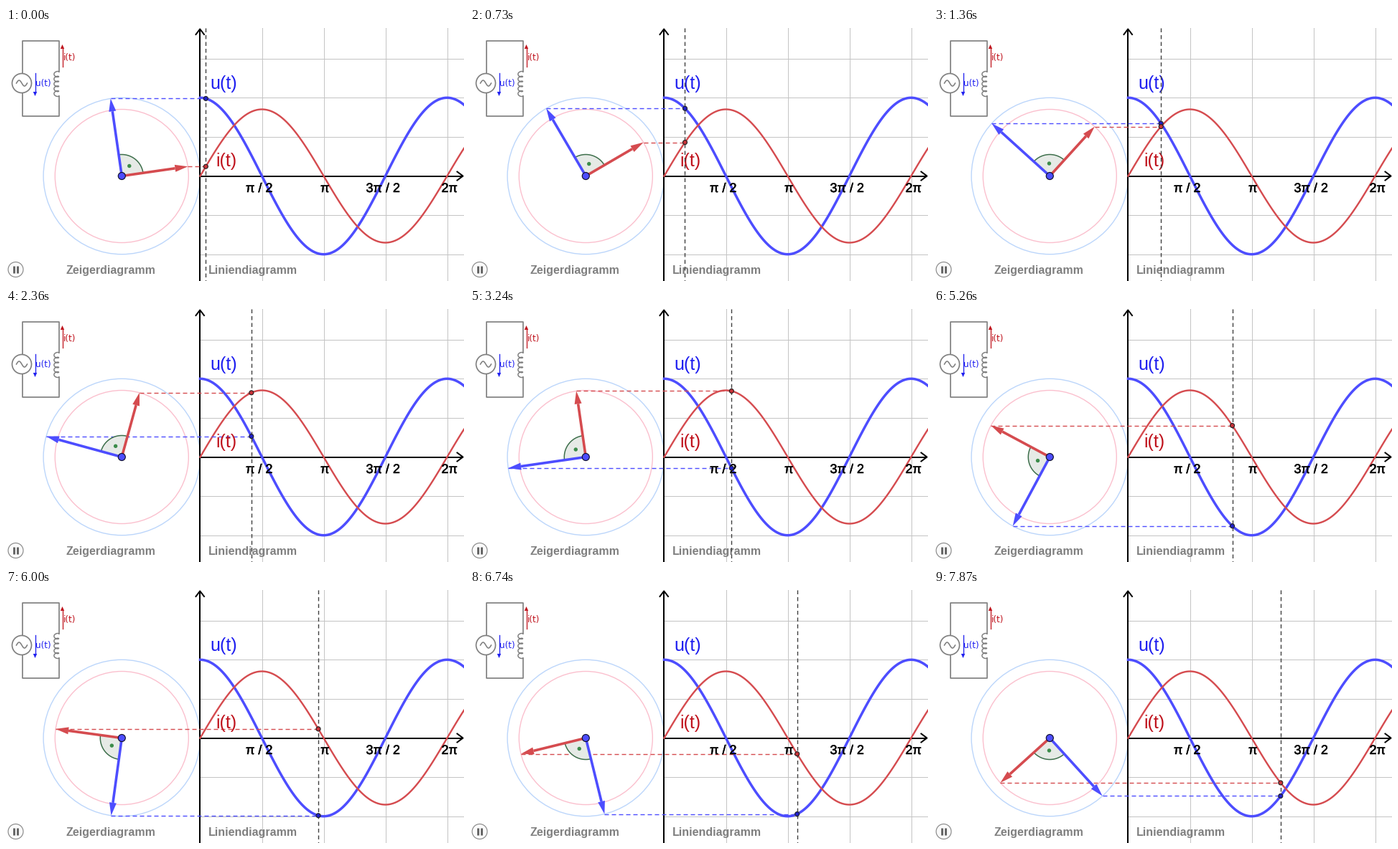
Write a matplotlib script that moves like this. It is 638x353 px and loops after 7990 ms.

```python
import numpy as np
import matplotlib.pyplot as plt
from matplotlib.animation import FuncAnimation
from matplotlib.patches import Circle, Polygon
from matplotlib.patheffects import withStroke

W, H, DPI = 638, 353, 100
LOOP, STEP = 7990, 34
PX = 72 / DPI

CX, CY = 161.3, 206.5          # phasor centre
X0, QUARTER = 270.5, 86.0      # time axis origin, pixels per quarter period
RU, RI = 109.2, 93.0           # amplitudes of voltage and current

BLUE, RED = "#4d4dff", "#d54b4f"
DEEP_BLUE, DEEP_RED = "#2020f0", "#c0141e"
GREY = "#808080"

plt.rcParams["lines.scale_dashes"] = False
plt.rcParams["path.simplify"] = False
plt.rcParams["toolbar"] = "None"

# Moments at which the picture advances: first, last, number of steps
RUNS = [(130, 860, 7), (980, 1740, 7), (1860, 2610, 7), (2740, 3490, 7),
        (3610, 4110, 5), (4250, 5000, 7), (5130, 5750, 6), (5890, 6250, 4),
        (6390, 7120, 7), (7250, 7870, 6)]
TICKS = np.concatenate([np.linspace(*run) for run in RUNS])

# Phase in degrees at some of the steps
KEY_STEP = [0, 7, 11, 14, 21, 26, 28, 33, 40, 42, 46, 50, 54, 57, 63]
KEY_PHASE = [8.2, 34.0, 47.8, 56.3, 82.0, 98.2, 104.3, 120.7, 145.6, 151.8,
             165.9, 178.5, 193.8, 202.8, 222.2]

fig = plt.figure(figsize=(W / DPI, H / DPI), dpi=DPI, facecolor="white")
ax = fig.add_axes([0, 0, 1, 1])
ax.set_xlim(0, W)
ax.set_ylim(H, 0)
ax.axis("off")


def line(xs, ys, color, width, z=2, dash=None, **kw):
    style = (0, [d * PX for d in dash]) if dash else "-"
    return ax.plot(xs, ys, color=color, lw=width * PX, ls=style, zorder=z,
                   dash_capstyle="butt", **kw)[0]


def disc(x, y, r, face, edge, width, z):
    return ax.add_patch(Circle((x, y), r, fc=face, ec=edge, lw=width * PX, zorder=z))


def label(x, y, s, size, color, font="Liberation Sans", weight="normal", stroke=0):
    t = ax.text(x, y, s, fontsize=size * PX, color=color, family=font,
                weight=weight, ha="left", va="baseline", zorder=6)
    if stroke:
        t.set_path_effects([withStroke(linewidth=stroke * PX, foreground=color)])


def polar(r, deg):
    a = np.radians(deg)
    return CX + r * np.cos(a), CY - r * np.sin(a)


def draw_circuit():
    line([73.5, 73.5, 22.5, 22.5], [61, 18, 18, 63.5], GREY, 1.7)
    line([73.5, 73.5, 22.5, 22.5], [95, 122.5, 122.5, 90.5], GREY, 1.7)
    disc(22, 77, 13.5, "white", GREY, 1.7, 3)
    s = np.linspace(-1, 1, 40)
    line(22 + 7.5 * s, 77 + 4 * np.sin(np.pi * s), GREY, 1.6, 4)
    th = np.linspace(0, 10 * np.pi, 240)
    line(73.5 - 3.3 * (1 - np.cos(th)), 61 + 34 * th / th[-1] - 1.9 * np.sin(th), GREY, 1.5)
    for x, tail, tip, color in [(78.5, 54, 23, DEEP_RED), (40.5, 63, 95, DEEP_BLUE)]:
        back = tip + 6 * np.sign(tail - tip)
        line([x, x], [tail, back], color, 1.3)
        ax.add_patch(Polygon([(x, tip), (x - 2.7, back), (x + 2.7, back)],
                             fc=color, ec="none", zorder=3))
    label(80, 45.5, "i(t)", 12, DEEP_RED, "DejaVu Sans")
    label(41, 81.5, "u(t)", 12, DEEP_BLUE, "DejaVu Sans")


def draw_plot():
    for k in range(1, 5):
        line([X0 + k * QUARTER] * 2, [0, H], "#c4c4c4", 1, 1)
    for k in (-3, -2, -1, 1, 2):
        line([X0, W], [CY + k * RU / 2] * 2, "#c4c4c4", 1, 1)
    line([270, W - 2], [207, 207], "black", 2, 3)
    line([270, 270], [2, H], "black", 2, 3)
    line([628.5, 636.5, 628.5], [200.5, 206.5, 212.5], "black", 2, 3)
    line([264.5, 270.2, 276], [9, 1.5, 9], "black", 2, 3)
    line([0, W], [352.5, 352.5], "#a8a8a8", 1, 3)

    x = np.linspace(X0, W, 400)
    a = (x - X0) / QUARTER * np.pi / 2
    line(x, CY - RU * np.cos(a), BLUE, 3.5, 4)
    line(x, CY - RI * np.sin(a), RED, 2.4, 4)

    for tx, s in [(334, "π / 2"), (438, "π"), (501.5, "3π / 2"), (606.5, "2π")]:
        label(tx, 229, s, 18, "black", stroke=0.5)
    label(284, 85, "u(t)", 25, DEEP_BLUE)
    label(292, 193.5, "i(t)", 25, DEEP_RED)
    label(83.8, 343.3, "Zeigerdiagramm", 16, GREY, weight="bold")
    label(281.7, 343.3, "Liniendiagramm", 16, GREY, weight="bold")


def draw_static():
    draw_circuit()
    draw_plot()
    disc(CX, CY, RU, "none", "#bcd6fb", 1.4, 2)
    disc(CX, CY, RI, "none", "#fbc0ce", 1.4, 2)
    disc(CX, CY, 5, BLUE, "#101030", 1.2, 9)
    disc(13.5, 337, 10.5, "#fafafa", "#8c8c8c", 1.2, 3)
    for x in (11, 16):
        line([x, x], [332, 342], "#686868", 3, 4, solid_capstyle="butt")


class Phasor:
    """Rotating arrow, its dashed projection and the point on the curve."""

    def __init__(self, r, width, color, dot_color):
        self.r, self.color = r, color
        self.shaft = line([], [], color, width, 8, solid_capstyle="butt")
        self.head = ax.add_patch(Polygon(np.zeros((3, 2)), fc=color, ec="none", zorder=8))
        self.ray = line([], [], color, 1.4, 5, dash=(6, 4))
        self.dot = disc(0, 0, 3, dot_color, "#202020", 1.1, 8)

    def set(self, deg, x):
        tip = np.array(polar(self.r, deg))
        along = (tip - (CX, CY)) / self.r
        side = np.array([-along[1], along[0]]) * 5
        back = tip - 18 * along
        self.shaft.set_data([CX, back[0]], [CY, back[1]])
        self.head.set_xy([tip, back + side, back - side])
        self.ray.set_data([tip[0], x], [tip[1], tip[1]])
        self.dot.center = (x, tip[1])


draw_static()
volt = Phasor(RU, 3.6, BLUE, "#2020c8")
amp = Phasor(RI, 3.6, RED, "#c83238")
cursor = line([], [], "#404040", 1.4, 7, dash=(5.5, 4))
wedge = ax.add_patch(Polygon(np.zeros((3, 2)), fc="#e6eae6", ec="none", zorder=6))
arc = line([], [], "#3c6e4a", 1.5, 7)
mark = disc(0, 0, 2.7, "#3c8c4a", "none", 0, 7)


def update(k):
    step = np.searchsorted(TICKS, k * STEP + STEP - 1, side="right")
    phase = np.interp(step, KEY_STEP, KEY_PHASE)
    x = X0 + phase / 90 * QUARTER
    volt.set(phase + 90, x)
    amp.set(phase, x)
    cursor.set_data([x, x], [0, H])
    rim_x, rim_y = polar(30, phase + np.linspace(0, 90, 40))
    arc.set_data(rim_x, rim_y)
    wedge.set_xy(np.column_stack([np.append(rim_x, CX), np.append(rim_y, CY)]))
    mark.center = polar(17.5, phase + 45)
    return []


anim = FuncAnimation(fig, update, frames=LOOP // STEP, interval=STEP,
                     init_func=lambda: update(0), repeat=True, repeat_delay=0,
                     blit=False)
plt.show()
```
